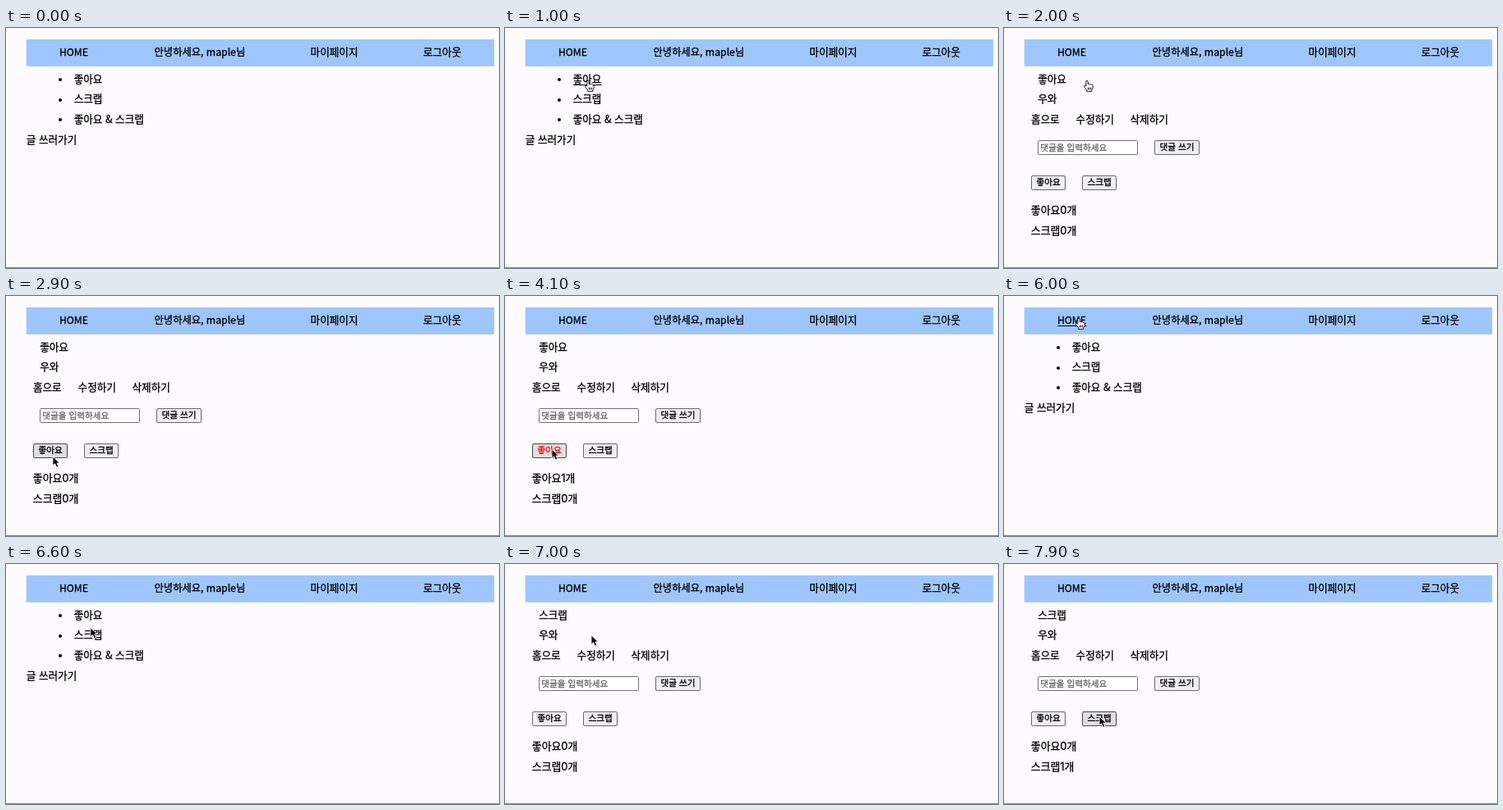
An HTML page for the animation above (8 s loop, 600 px wide and 293 px high).

```html
<!DOCTYPE html>
<html lang="ko">
<head>
<meta charset="utf-8">
<title>게시판</title>
<style>
html, body { margin: 0; width: 100%; height: 100%; overflow: hidden; background: #fdfbfe; }
svg { display: block; width: 600px; height: 293px; }
text {
  font: 12.6px "Noto Sans CJK KR", "Noto Sans CJK", "Noto Sans", sans-serif;
  fill: #000; stroke: #000; stroke-width: .3; white-space: pre;
}
.caps { font-size: 12.2px; }
.greet { font-size: 12.25px; }
.count { font: 12.9px Inter, "Noto Sans CJK KR", "Noto Sans CJK", sans-serif; }
.small { font-size: 10.6px; }
.hint { fill: #666; stroke: #666; }
.button rect { fill: #efeef0; stroke: #686868; }
.button.hover rect { fill: #dfdee0; stroke: #484848; }
.button.liked text { fill: #f00; stroke: #f00; }
.link line { stroke: #000; visibility: hidden; }
.link.hover line { visibility: visible; }
.off { display: none; }
</style>
</head>
<body>
<svg id="stage" viewBox="0 0 600 293">
  <rect width="600" height="293" fill="#fdfbfe"/>
  <rect x="24.7" y="13.8" width="569.5" height="33" fill="#9ec6fc"/>
  <path d="M0 292.5H600" stroke="#858585"/>
  <g id="nav"></g>
  <g id="list">
    <circle cx="66" cy="63" r="2"/>
    <circle cx="66" cy="88" r="2"/>
    <circle cx="66" cy="112" r="2"/>
  </g>
  <g id="post">
    <text id="title" x="41.2" y="66.8"></text>
    <text x="41.2" y="91.4">우와</text>
    <rect x="41.5" y="137.5" width="121" height="17" rx="1" fill="#fff" stroke="#707070"/>
    <text class="small hint" x="44.3" y="149.6">댓글을 입력하세요</text>
    <text id="likes" class="count" x="32.8" y="227"></text>
    <text id="scraps" class="count" x="32.8" y="251.5"></text>
  </g>
  <g id="cursor">
    <path id="arrow" d="M0 0V11.2L2.6 8.8L4.6 13.2L6.8 12.2L4.9 8H8.4Z"
          fill="#000" stroke="#fff" stroke-width=".9"/>
    <path id="hand" d="M-1.2 7.2V.9Q0-.9 1.2.9V4.6Q2.4 3.6 3.4 4.9Q4.6 4.1 5.5 5.4Q7.2 5 7.2 6.7V9.4L5.8 11.6V13.4H-.2V11.8L-3.6 7.8Q-3.6 5.9-2.3 6.3ZM1.4 8.6V11.4M3.1 8.6V11.4M4.8 8.6V11.4"
          fill="#fff" stroke="#000" stroke-width=".9" stroke-linejoin="round"/>
  </g>
</svg>
<script>
const NS = 'http://www.w3.org/2000/svg';
const LOOP = 8000, STEP = 100;
const $ = id => document.getElementById(id);
const targets = [];

function add(parent, tag, attrs) {
  const el = parent.appendChild(document.createElementNS(NS, tag));
  for (const k in attrs) el.setAttribute(k, attrs[k]);
  return el;
}

function link(parent, x, y, label, w, cls = '') {
  const el = add(parent, 'g', { class: 'link' });
  add(el, 'text', { x, y, class: cls }).textContent = label;
  const line = Math.round(y + 2) + .5;
  add(el, 'line', { x1: x + .3, x2: x + w, y1: line, y2: line });
  targets.push({ el, parent, x, y: y - 11, w, h: 15, link: true });
}

function button(x, y, w, label) {
  const el = add($('post'), 'g', { class: 'button' });
  add(el, 'rect', { x: x + .5, y: y + .5, width: w - 1, height: 17, rx: 1.5 });
  add(el, 'text', { x: x + 6.6, y: y + 12.4, class: 'small' }).textContent = label;
  targets.push({ el, parent: $('post'), x, y, w, h: 18 });
  return el;
}

link($('nav'), 64.9, 34.2, 'HOME', 35.5, 'caps');
link($('nav'), 180.6, 34.2, '안녕하세요, maple님', 110, 'greet');
link($('nav'), 370.6, 34.2, '마이페이지', 58);
link($('nav'), 507.7, 34.2, '로그아웃', 46);
link($('list'), 82.7, 66.8, '좋아요', 35);
link($('list'), 82.7, 91.4, '스크랩', 35);
link($('list'), 82.7, 116, '좋아요 & 스크랩', 85);
link($('list'), 24.8, 140.6, '글 쓰러가기', 61);
link($('post'), 32.9, 116, '홈으로', 35);
link($('post'), 87.6, 116, '수정하기', 46);
link($('post'), 153.5, 116, '삭제하기', 46);
button(183, 137, 55, '댓글 쓰기');
const likeButton = button(33, 180, 42, '좋아요');
button(95, 180, 42, '스크랩');

// Pointer stops: time, x, y
const stops = [
  [400, 160, 280], [900, 101, 64], [2400, 101, 64], [2800, 57, 196],
  [3300, 57, 196], [3600, 57, 187], [4500, 57, 187], [5300, 91, 27],
  [6300, 91, 27], [6700, 105, 87], [7200, 105, 87], [7600, 116, 186], [LOOP, 116, 186]
];

function pointer(t) {
  const i = Math.max(1, stops.findIndex(s => s[0] > t));
  const [t0, x0, y0] = stops[i - 1], [t1, x1, y1] = stops[i];
  const p = Math.max(0, (t - t0) / (t1 - t0));
  const e = p * p * (3 - 2 * p);
  return [x0 + (x1 - x0) * e, y0 + (y1 - y0) * e];
}

const show = (el, on) => el.classList.toggle('off', !on);

function draw(t) {
  const [px, py] = pointer(t);
  const second = t >= 5700;
  const onPost = t >= 1800 && !second || t >= 6800;
  const liked = t >= 3800 && !second;
  show($('list'), !onPost);
  show($('post'), onPost);
  $('title').textContent = second ? '스크랩' : '좋아요';
  $('likes').textContent = `좋아요${+liked}개`;
  $('scraps').textContent = `스크랩${+(t >= 7700)}개`;
  likeButton.classList.toggle('liked', liked);

  // The hand lingers briefly after the first page load
  let hand = t >= 1800 && t < 2200;
  for (const { el, parent, x, y, w, h, link } of targets) {
    const over = t >= 400 && !parent.classList.contains('off') &&
      px >= x && px <= x + w && py >= y && py <= y + h;
    el.classList.toggle('hover', over);
    if (over && link) hand = true;
  }
  show($('cursor'), t >= 400);
  show($('hand'), hand);
  show($('arrow'), !hand);
  $('cursor').setAttribute('transform', `translate(${px} ${py})`);
}

function tick() {
  draw(Math.floor(performance.now() % LOOP / STEP) * STEP);
  requestAnimationFrame(tick);
}
tick();
</script>
</body>
</html>
```
